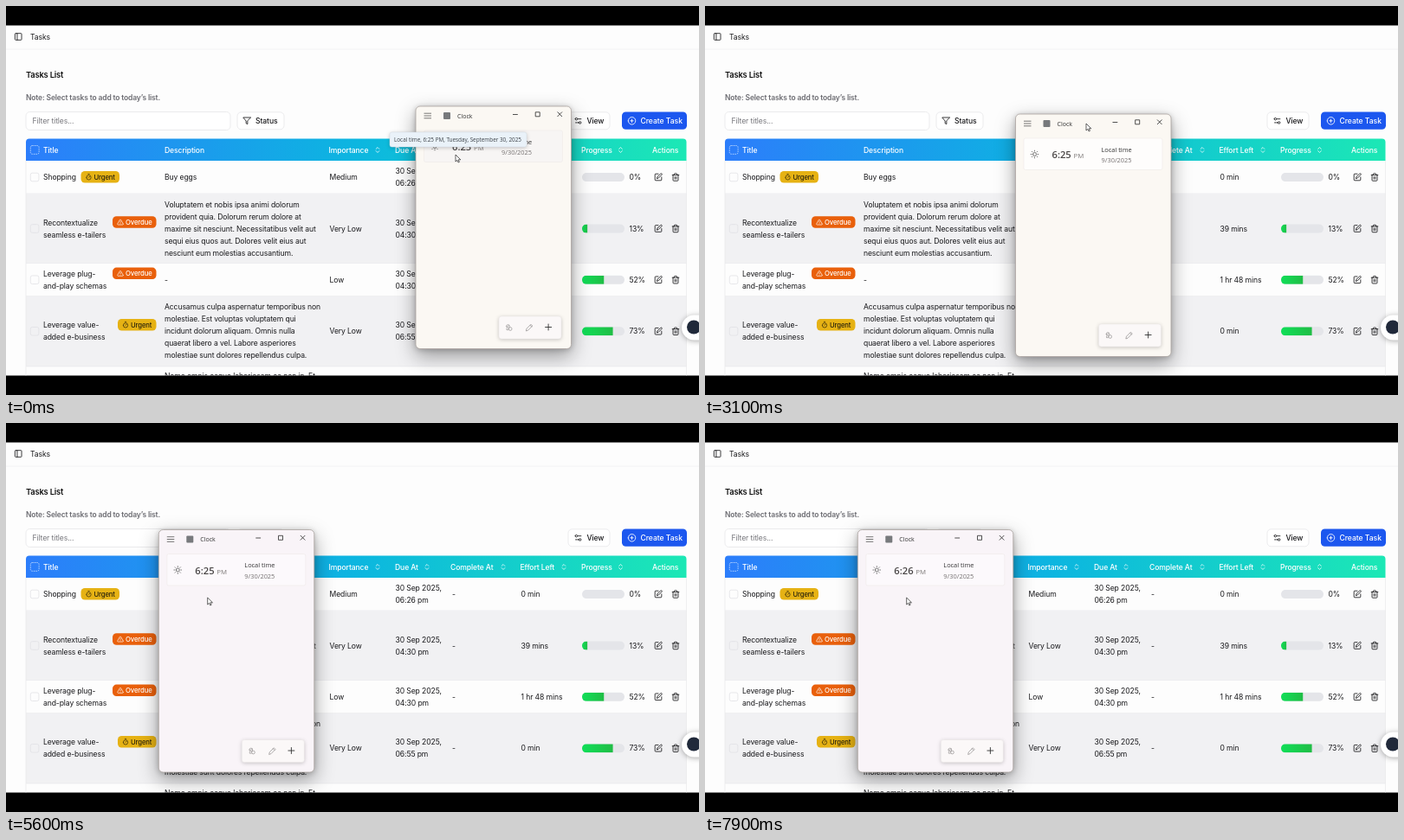
Recreate the animation shown at these times as an HTML page. Size 800 by 450 pixels, loop 8000 ms.

```html
<!DOCTYPE html>
<html>
<head>
<meta charset="utf-8">
<title>Tasks</title>
<style>
html, body { margin: 0; width: 100%; height: 100%; overflow: hidden; background: #000; }
svg { display: block; width: 800px; height: 450px; }
text { font: 8.6px Inter, sans-serif; letter-spacing: -.11px; white-space: pre; }
#win text, #tip text { font-family: "Open Sans", sans-serif; letter-spacing: 0; }
#win { filter: drop-shadow(0 1px 3px rgba(0, 0, 0, .2)) drop-shadow(0 8px 11px rgba(0, 0, 0, .36)); }
</style>
</head>
<body>
<svg id="stage" viewBox="0 0 800 450"></svg>
<script>
const INK = '#18181b';
const ICONS = {
  panel: 'M5 3h14a2 2 0 0 1 2 2v14a2 2 0 0 1-2 2H5a2 2 0 0 1-2-2V5a2 2 0 0 1 2-2M9 3v18',
  funnel: 'M22 3H2l8 9.5V19l4 2v-8.5z',
  sliders: 'M20 7h-9M14 17H5M14 17a3 3 0 1 0 6 0a3 3 0 1 0-6 0M4 7a3 3 0 1 0 6 0a3 3 0 1 0-6 0',
  add: 'M2 12a10 10 0 1 0 20 0a10 10 0 1 0-20 0M8 12h8M12 8v8',
  pen: 'M12 3H5a2 2 0 0 0-2 2v14a2 2 0 0 0 2 2h14a2 2 0 0 0 2-2v-7M18.4 2.6a2.1 2.1 0 0 1 3 3L12.4 14.6 8 16l1.4-4.4z',
  trash: 'M3 6h18M19 6v14a2 2 0 0 1-2 2H7a2 2 0 0 1-2-2V6M8 6V4a2 2 0 0 1 2-2h4a2 2 0 0 1 2 2v2M10 11v6M14 11v6',
  timer: 'M10 2h4M12 14l3-3M4 14a8 8 0 1 0 16 0a8 8 0 1 0-16 0',
  alert: 'M21.7 18l-8-14a2 2 0 0 0-3.5 0l-8 14A2 2 0 0 0 4 21h16a2 2 0 0 0 1.7-3M12 9v4M12 17h.01',
  sort: 'M7 15l5 5 5-5M7 9l5-5 5 5',
  sun: 'M7 12a5 5 0 1 0 10 0a5 5 0 1 0-10 0M12 1v2M12 21v2M1 12h2M21 12h2M4 4l1.5 1.5M18.5 18.5l1.5 1.5M4 20l1.5-1.5M18.5 5.5l1.5-1.5',
  pencil: 'M3 21l1.5-6L17 2.5l4.5 4.5L9 19.5zM14.5 5l4.5 4.5',
  worlds: 'M3 8a5 5 0 0 1 10 0a5 5 0 0 1-10 0M5 11l6-6M10 16a5 5 0 0 1 10 0a5 5 0 0 1-10 0M4 15v4h5'
};

const rect = (x, y, w, h, fill, r = 0, extra = '') =>
  `<rect x="${x}" y="${y}" width="${w}" height="${h}" fill="${fill}" rx="${r}" ${extra}/>`;
const text = (x, y, s, fill = INK, style = '') =>
  `<text x="${x}" y="${y}" fill="${fill}" style="${style}">${s}</text>`;
const line = (d, color, w = .8) =>
  `<path d="${d}" fill="none" stroke="${color}" stroke-width="${w}"/>`;
// Icon centred on (x, y), drawn on a 24-unit grid
const icon = (name, x, y, color = INK, size = 10.2, weight = 2) =>
  `<path d="${ICONS[name]}" transform="translate(${x - size / 2} ${y - size / 2}) scale(${size / 24})"
    fill="none" stroke="${color}" stroke-width="${weight}" stroke-linecap="round" stroke-linejoin="round"/>`;
const stroke = color => `stroke="${color}" stroke-width=".7"`;
const lines = (x, cy, list) =>
  list.map((s, i) => text(x, cy + 3.2 + (i - (list.length - 1) / 2) * 14, s)).join('');

function badge(kind, x, y) {
  const late = kind === 'Overdue', color = late ? '#fff' : '#29220c';
  return rect(x, y, late ? 50.5 : 44.5, 13.5, late ? '#e9600b' : '#e6b214', 4.5) +
    icon(late ? 'alert' : 'timer', x + 9, y + 6.7, color, 8) +
    text(x + 15, y + 9.5, kind, color, 'font-size:7.7px;font-weight:500');
}

const rows = [
  { y: 179, h: 38, title: ['Shopping'], badge: ['Urgent', 86.5, 191], desc: ['Buy eggs'],
    level: 'Medium', due: '06:26 pm', effort: '0 min', done: 0 },
  { y: 217, h: 81, title: ['Recontextualize', 'seamless e-tailers'], badge: ['Overdue', 123, 243.3],
    desc: ['Voluptatem et nobis ipsa animi dolorum', 'provident quia. Dolorum rerum dolore at',
      'maxime sit nesciunt. Necessitatibus velit aut', 'sequi eius quos aut. Dolores velit eius aut',
      'nesciunt eum molestias accusantium.'],
    level: 'Very Low', due: '04:30 pm', effort: '39 mins', done: 13 },
  { y: 298, h: 37.5, title: ['Leverage plug-', 'and-play schemas'], badge: ['Overdue', 123, 302.6], desc: ['-'],
    level: 'Low', due: '04:30 pm', effort: '1 hr 48 mins', done: 52 },
  { y: 335.5, h: 81.5, title: ['Leverage value-', 'added e-business'], badge: ['Urgent', 129, 362],
    desc: ['Accusamus culpa aspernatur temporibus non', 'molestiae. Est voluptas voluptatem qui',
      'incidunt dolorum aliquam. Omnis nulla', 'quaerat libero a vel. Labore asperiores',
      'molestiae sunt dolores repellendus culpa.'],
    level: 'Very Low', due: '06:55 pm', effort: '0 min', done: 73 }
];

function drawRow(r, i) {
  const cy = r.y + r.h / 2;
  return rect(23, r.y, 762.5, r.h, i % 2 ? '#f1f1f3' : '#fdfdfd', 0, `id="row${i}"`) +
    line(`M23 ${r.y + r.h}H785.5`, '#e6e6e8', .6) +
    rect(28.3, cy - 4.8, 9.6, 9.6, 'none', 2, stroke('#dedee2')) +
    lines(43, cy, r.title) + badge(...r.badge) + lines(183, cy, r.desc) +
    text(373.5, cy + 3.2, r.level) + lines(449.5, cy, ['30 Sep 2025,', r.due]) +
    text(515, cy + 3.2, '-') + text(594.5, cy + 3.2, r.effort) +
    rect(665, cy - 4.9, 49, 10, '#e4e5e9', 5) +
    rect(665, cy - 4.9, .49 * r.done, 10, 'url(#bar)', 0, 'clip-path="inset(0 0 0 0 round 5px 0 0 5px)"') +
    text(719.5, cy + 3.2, r.done + '%') + icon('pen', 753, cy) + icon('trash', 773, cy);
}

const columns = [['Title', 43], ['Description', 183], ['Importance', 372.5, 429], ['Due At', 449, 486],
  ['Complete At', 513, 574], ['Effort Left', 593.5, 644], ['Progress', 664, 709.5], ['Actions', 746]];
const header = '<path d="M23 179V157.5a4 4 0 0 1 4-4H781.5a4 4 0 0 1 4 4V179z" fill="url(#head)"/>' +
  rect(28.3, 161.5, 9.8, 9.8, 'none', 2, 'stroke="#d5e7ff" stroke-width=".8" stroke-dasharray="1.5 1"') +
  columns.map(([name, x, sort]) => text(x, 169.8, name, '#fff', 'font-weight:500') +
    (sort ? icon('sort', sort, 166.5, '#fff', 9) : '')).join('');

const page = rect(0, 22, 800, 406, '#fdfdfd') + line('M0 50H800', '#efeff1') +
  icon('panel', 14.2, 35.5) + text(28, 38.5, 'Tasks') +
  text(23, 83, 'Tasks List', '#111', 'font-size:9.4px;font-weight:600;letter-spacing:-.2px') +
  text(23, 108.5, 'Note: Select tasks to add to today’s list.', '#6c6c72', 'font-size:8.5px;font-weight:600;letter-spacing:-.15px') +
  rect(23, 122.5, 236, 21, '#fff', 4.5, stroke('#e2e2e5')) + text(30.5, 136, 'Filter titles...', '#77777c') +
  rect(267, 122.8, 54, 20, '#fff', 4.5, stroke('#e2e2e5')) + icon('funnel', 278, 132.8) +
  text(288, 136, 'Status', INK, 'font-weight:500') +
  rect(649, 122.8, 48, 20, '#fff', 4.5, stroke('#e2e2e5')) + icon('sliders', 660.5, 132.8) +
  text(670.5, 136, 'View', INK, 'font-weight:500') +
  rect(711, 122.5, 75, 20.3, '#1c57ef', 4.5) + icon('add', 722.5, 132.8, '#fff') +
  text(732.5, 136, 'Create Task', '#fff', 'font-weight:500;letter-spacing:-.05px') +
  header + rows.map(drawRow).join('') +
  text(183, 431.2, 'Nemo omnis eaque laboriosam ea non in. Et') +
  line('M23 179V428M785.5 179V428', '#e6e6e8', .6);

const clock = rect(0, 0, 179.5, 280.5, 'none', 5, 'id="pane" stroke="#aaa39f" stroke-width=".8"') +
  line('M9.5 8.2h8.5M9.5 11h8.5M9.5 13.8h8.5', '#555') +
  rect(32, 7, 8, 8, '#77797c', 1) + text(48, 13.6, 'Clock', '#333', 'font-size:7px') +
  line('M112 9.5h5.8M138.2 6.8h5v5h-5zM163.5 6.5l5.5 5.5M169 6.5l-5.5 5.5', '#333', .85) +
  rect(9.5, 28, 160, 36.5, '#fefdfc', 2, 'id="card" stroke="#eeeae8" stroke-width=".6"') +
  icon('sun', 22, 46.5, '#555', 9.5) +
  `<text id="time" x="42" y="51" fill="#484545" style="font-size:11.2px;font-weight:600"></text>` +
  text(67, 51, 'PM', '#7e7a79', 'font-size:7.8px') +
  text(99, 43.5, 'Local time', '#333', 'font-size:7.4px') +
  text(99, 56, '9/30/2025', '#747070', 'font-size:7.4px') +
  rect(96, 243, 72, 26, '#fbf8f8', 3, 'stroke="#e8e4e4" stroke-width=".5" style="filter:drop-shadow(0 1.5px 2px #0003)"') +
  icon('worlds', 108, 256, '#9a9797', 9) + icon('pencil', 131, 256, '#9a9797', 9.5) +
  line('M149.2 255.5h7.8M153.1 251.6v7.8', '#333', .9);

const stage = document.getElementById('stage');
stage.innerHTML = `<defs>
  <linearGradient id="head"><stop stop-color="#2c7dfb"/><stop offset=".5" stop-color="#0cb6e0"/><stop offset="1" stop-color="#1ce8b5"/></linearGradient>
  <linearGradient id="bar"><stop stop-color="#10df58"/><stop offset="1" stop-color="#20bd45"/></linearGradient>
  <clipPath id="view"><path d="M0 22.5H800V427.5H0z"/></clipPath></defs>
  <g clip-path="url(#view)">${page}
    ${rect(780, 357.5, 40, 29, '#fff', 14.5, 'style="filter:drop-shadow(0 1px 3px #0005)"')}
    <circle cx="794" cy="371.5" r="8" fill="#20293a"/>
    <g id="win">${clock}</g>
    <g id="tip">${rect(443, 146, 158, 17, '#eaf2f9', 2.5, 'stroke="#d2dae2" stroke-width=".5" style="filter:drop-shadow(0 1px 2px #0003)"')}
      ${text(448, 157, 'Local time, 6:25 PM, Tuesday, September 30, 2025', '#3c4248', 'font-size:6.35px')}</g>
    <path id="cursor" d="M0 0V8L1.9 6.3 3.1 9 4.4 8.4 3.2 5.8H5.8Z" fill="#fff" stroke="#222" stroke-width=".7"/>
  </g>`;

// Pointer keys: time, x, y; the window is held from GRAB to DROP
const GRAB = 2700, DROP = 3600;
const keys = [[0, 519, 172], [300, 519, 172], [1100, 242, 205], [1800, 242, 205], [2500, 554.5, 127],
  [GRAB, 554.5, 127], [3100, 440, 136], [3500, 259.5, 135.3], [DROP, 257.8, 134.5], [4500, 232.7, 202], [8000, 232.7, 202]];

function pointer(t) {
  const i = keys.findIndex((k, n) => n && t < k[0]);
  const [a, b] = [keys[i - 1], keys[i]];
  let p = (t - a[0]) / (b[0] - a[0]);
  if (a[0] < GRAB || a[0] >= DROP) p *= p * (3 - 2 * p);
  return [1, 2].map(n => a[n] + (b[n] - a[n]) * p);
}

const $ = id => document.getElementById(id);
const move = (id, x, y) => $(id).setAttribute('transform', `translate(${x} ${y})`);
const inside = (x, y, l, t, w, h) => x > l && x < l + w && y > t && y < t + h;

function frame(now) {
  const t = Math.floor(now % 8000 / 100) * 100;
  const [x, y] = pointer(t);
  const [hx, hy] = pointer(Math.min(Math.max(t, GRAB), DROP));
  const wx = hx - 81.5, wy = hy - 11;
  const overWin = inside(x, y, wx, wy, 179.5, 280.5);
  move('cursor', x, y);
  move('win', wx, wy);
  // The pane turns from cream to lilac towards the left
  const tint = ((473 - wx) / 297) ** 3;
  $('pane').setAttribute('fill', `rgb(${251 - 2 * tint},${248 - 4 * tint},${243 + 5 * tint})`);
  $('card').setAttribute('fill', inside(x, y, wx + 9.5, wy + 28, 160, 36.5) ? '#f7f5f4' : tint > .5 ? '#fcf9fc' : '#fefdfc');
  $('time').textContent = t < 7500 ? '6:25' : '6:26';
  $('tip').setAttribute('visibility', t < 500 ? 'visible' : 'hidden');
  rows.forEach((r, i) => $('row' + i).setAttribute('fill',
    !overWin && inside(x, y, 23, r.y, 762.5, r.h) ? '#eff5fe' : i % 2 ? '#f1f1f3' : '#fdfdfd'));
  requestAnimationFrame(frame);
}
requestAnimationFrame(frame);
</script>
</body>
</html>
```
